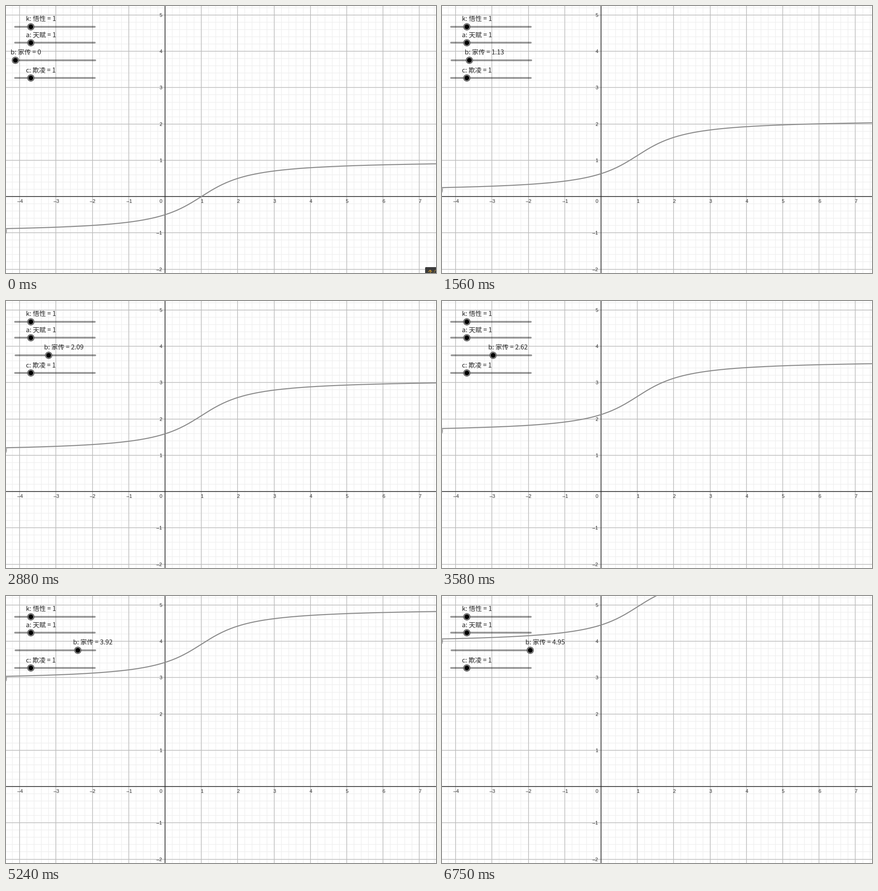
Write a matplotlib script that moves like this. It is 949 px wide and 590 px high and loops after 6830 ms.

```python
import numpy as np
import matplotlib.pyplot as plt
from matplotlib.animation import FuncAnimation
from matplotlib.patches import Circle, FancyBboxPatch

W, H, DPI = 949, 590, 100
LOOP, TICK = 6830, 10
STEP, LEAD = 78.2, 13               # length of a slider step and head start, ms
PX = 72 / DPI                       # one pixel in points
X0, Y0, UNIT = 350.95, 421.1, 80.22  # origin and scale of the plot
INK = "#252525"
SLIDE = 35.15                       # slider pixels per unit

# slider value at a few steps: slow start, steady climb, slow end
KEYS = [0, 8, 20, 37, 67, 81, 86], [0, .43, 1.13, 2.15, 3.92, 4.73, 4.95]

fig = plt.figure(figsize=(W / DPI, H / DPI), dpi=DPI, facecolor="white")
ax = fig.add_axes([0, 0, 1, 1])
ax.set_xlim(0, W)
ax.set_ylim(H, 0)
ax.axis("off")


def px(x):
    return X0 + UNIT * x


def py(y):
    return Y0 - UNIT * y


def rules(xs, ys, color, width, z):
    style = dict(colors=color, lw=width * PX, zorder=z, snap=False)
    ax.vlines(np.round(px(xs)), 0, H, **style)
    ax.hlines(np.round(py(ys)), 0, W, **style)


def write(x, y, s, size, font, ha="left"):
    return ax.text(x, y, s, fontsize=size * PX, family=font, color=INK,
                   ha=ha, va="baseline", zorder=6)


def stroke(x, y, color, width, z, **kw):
    return ax.plot(x, y, color=color, lw=width * PX, zorder=z, **kw)[0]


def number(v):
    return str(v).replace("-", "–")


class Slider:
    def __init__(self, name, left, y, value):
        self.name, self.left, self.y = name, left, y
        stroke([left, left + 176], [y, y], "black", 4, 3, alpha=0.4,
               solid_capstyle="round")
        self.halo = ax.add_patch(Circle((0, y), 7.4, fc="#8f8f8f", ec="#444444",
                                        lw=PX, zorder=4))
        self.core = ax.add_patch(Circle((0, y), 5.2, fc="black", lw=0, zorder=5))
        self.label = write(0, y - 13, "", 14.4, "Noto Sans CJK JP")
        self.set(value)

    def set(self, value):
        x = self.left + SLIDE * value
        self.halo.center = self.core.center = (x, self.y)
        self.label.set_x(x - 10.6)
        self.label.set_text(f"{self.name} = {value:g}")


# grid and axes
rules(np.arange(-22, 38) / 5, np.arange(-11, 27) / 5, "#eeeeee", 1.2, 0)
rules(np.arange(-4, 8), np.arange(-2, 6), "#bcbcbc", 1.4, 1)
rules(np.zeros(1), np.zeros(1), INK, 1.5, 2)
for n in range(-4, 8):
    if n:
        write(px(n) + 0.9, 435, number(n), 11, "Liberation Sans", "center")
for n in range(-2, 6):
    base = np.round(py(n)) + (4 if n else 14)
    write(344.5, base, number(n), 11, "Liberation Sans", "right")

# sliders
Slider("k: 悟性", 19.7, 46, 1)
Slider("a: 天赋", 19.7, 81.3, 1)
Slider("c: 欺凌", 19.7, 159, 1)
b_slider = Slider("b: 家传", 20.7, 120, 0)

# curve and the clipped label at its left end
xs = np.linspace(-4.5, 7.6, 220)
shape = 2 / np.pi * np.arctan(xs - 1)
curve = stroke(px(xs), py(shape), "#888888", 2.2, 5)
mark_y = np.array([494.5, 494.5, 497.5, 497.5, 502])
mark = stroke([2, 0.5, 0.5, 1.5, 0.5], mark_y, "#777777", 1, 5)

# tooltip corner
tip = [
    ax.add_patch(FancyBboxPatch((926, 578), 40, 30, fc="#3b3b3b", lw=0, zorder=7,
                                boxstyle="round,pad=1,rounding_size=2")),
    stroke([936, 936], [583.5, 592], "#c8962e", 1.4, 8),
    stroke([932.5, 936, 939.5], [587, 583.5, 587], "#c8962e", 1.4, 8),
    stroke([944.5, 946, 949], [590, 584.5, 584], "#a8843a", 1, 8),
]


def update(i):
    step = (i * TICK + LEAD) // STEP
    b = round(float(np.interp(step, *KEYS)), 2)
    b_slider.set(b)
    curve.set_ydata(py(shape + b))
    mark.set_ydata(mark_y - UNIT * b)
    for part in tip:
        part.set_visible(step == 0)
    return [curve, mark]


anim = FuncAnimation(fig, update, frames=LOOP // TICK, interval=TICK,
                     repeat=True, repeat_delay=0, blit=False)
plt.show()
```
